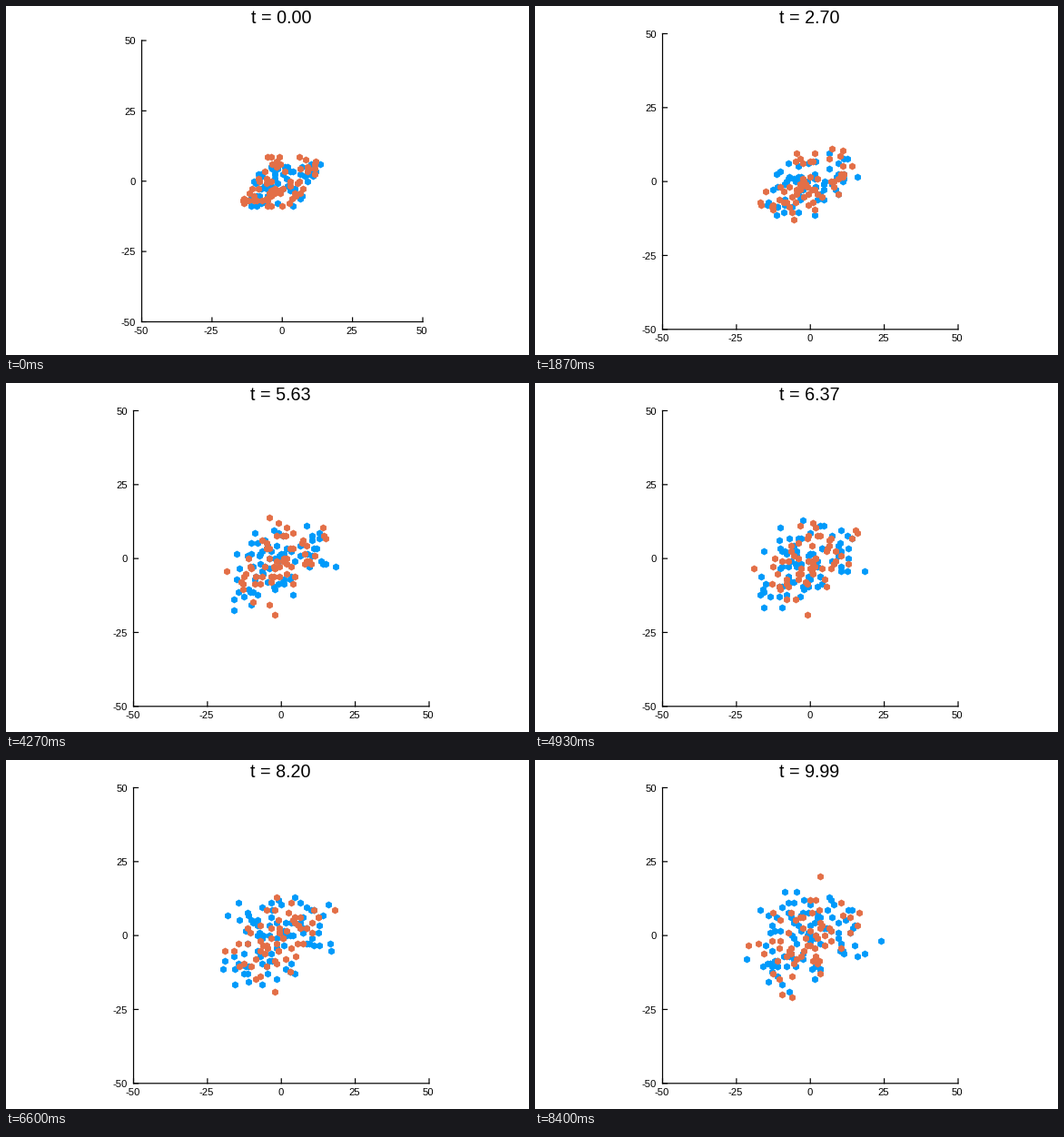
A matplotlib script that plays this animation: 576 by 384 pixels, repeating every 8470 ms.

```python
import math
import random

import matplotlib.pyplot as plt
import numpy as np
from matplotlib.animation import FuncAnimation

W, H, DPI = 576, 384, 72
FRAMES, LOOP = 127, 8470
BLUE, ORANGE = "#009afa", "#e36f47"
ROW = math.sqrt(3) / 2  # height of one lattice row
HOPS = [(1, 0), (-1, 0), (0.5, 1), (-0.5, 1), (0.5, -1), (-0.5, -1)]
HOP_CHANCE = 0.5

# Clock reading at a few steps; it runs slower as the population grows.
STEPS = [0, 28, 47, 64, 83, 112, 125]
CLOCK = [0, 2.70, 4.32, 5.63, 7.19, 9.14, 9.99]


def hop(cell, rng):
    dx, dj = rng.choice(HOPS)
    return cell[0] + dx, cell[1] + dj


def simulate(count, births, seed):
    """Cells start in a slanted patch of a triangular lattice, hop and divide."""
    rng = random.Random(seed)
    patch = [(i + j / 2, j) for i in range(-10, 11) for j in range(-10, 11)]
    cells = rng.sample(patch, count)
    history = [cells]
    for n in range(1, FRAMES):
        cells = [hop(c, rng) if rng.random() < HOP_CHANCE else c for c in cells]
        if n * births // FRAMES > (n - 1) * births // FRAMES:
            cells.append(hop(rng.choice(cells), rng))
        history.append(cells)
    return history


blue_run = simulate(52, 44, seed=4)
orange_run = simulate(60, 0, seed=9)

plt.rcParams["font.family"] = "Liberation Sans"
fig = plt.figure(figsize=(W / DPI, H / DPI), dpi=DPI, facecolor="white")
ax = fig.add_axes([0, 0, 1, 1])


def draw_axes(left, right, top, bottom, tick):
    def line(xs, ys):
        ax.plot(xs, ys, color="black", lw=1.2, snap=False)

    def label(x, y, v, ha):
        ax.text(x, y, str(v), size=11.2, ha=ha, va="baseline")

    line([left, left, right], [top, bottom, bottom])
    for v in range(-50, 51, 25):
        part = (v + 50) / 100
        x = left + part * (right - left)
        y = bottom - part * (bottom - top)
        line([x, x], [bottom, bottom - tick])
        line([left, left + tick], [y, y])
        label(x - 0.7, bottom + 13.3, v, "center")
        label(left - 6.3, y + 4.2, v, "right")


def draw_cells(cells, color, left, right, top, bottom):
    unit = (right - left) / 100
    x, j = np.array(cells).T
    ax.scatter((left + right) / 2 - 0.3 + x * unit,
               (top + bottom) / 2 - j * ROW * unit,
               s=64, marker="h", color=color, linewidths=0, zorder=3)


def update(n):
    ax.clear()
    ax.set(xlim=(0, W), ylim=(H, 0))
    ax.axis("off")
    # The plot area settles into its final size after the opening picture.
    box = (149.5, 459, 38, 347.5) if n == 0 else (140.5, 466, 30.5, 355.8)
    draw_axes(*box, 4.5 if n == 0 else 5)
    draw_cells(blue_run[n], BLUE, *box)
    draw_cells(orange_run[n], ORANGE, *box)
    t = np.interp(n, STEPS, CLOCK)
    ax.text((box[0] + box[1]) / 2 - 0.7, 19, f"t = {t:.2f}", size=19.7,
            ha="center", va="baseline")
    return []


anim = FuncAnimation(fig, update, frames=FRAMES, interval=LOOP / FRAMES,
                     repeat=True, repeat_delay=0, blit=False)
plt.show()
```
